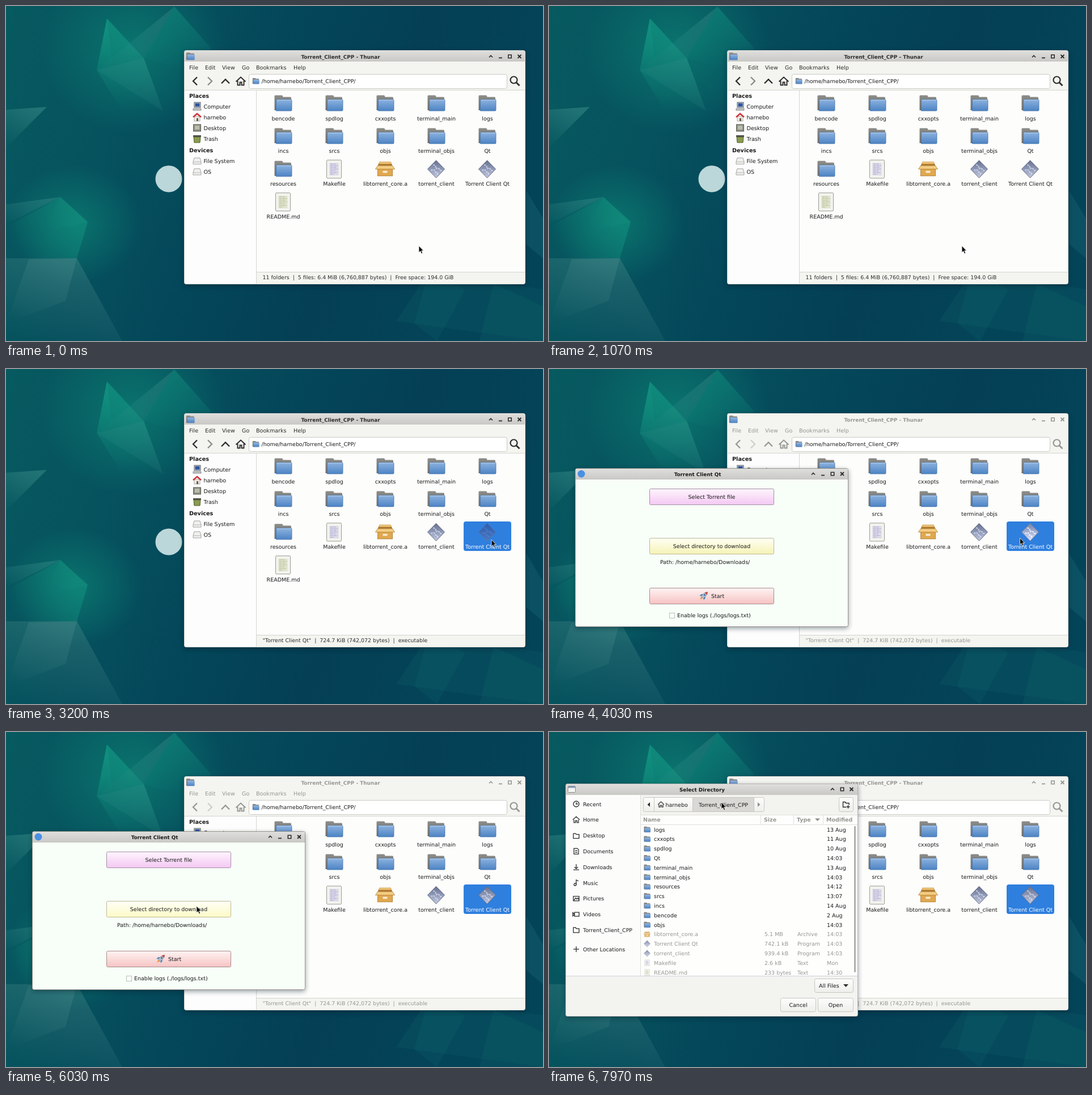
An HTML page for the animation above (8 s loop, 947 by 591 pixels).

```html
<!DOCTYPE html>
<html lang="en">
<head>
<meta charset="utf-8">
<title>Torrent Client Qt</title>
<style>
  html, body { margin: 0; width: 100%; height: 100%; overflow: hidden; background: #04495c; }
  svg { display: block; width: 100vw; height: 100vh; }
  text { font: 9.5px "DejaVu Sans", sans-serif; fill: #1a1a1a; white-space: pre; text-rendering: geometricPrecision; }
  #files { --fg: #2c2c2c; --off: #8b8b89; }
  #files.back { --fg: #969692; --off: #cfcfcb; }
  #files.back .bar { fill: #f4f4f0; }
  #files .fg { fill: var(--fg); }
  #files .ln { stroke: var(--fg); }
  #files .off { stroke: var(--off); }
  .ln, .off { fill: none; stroke: #2c2c2c; }
</style>
</head>
<body>
<svg id="stage" viewBox="0 0 947 591" xmlns="http://www.w3.org/2000/svg"></svg>
<script>
const USER = 'harnebo', LOOP = 8000;

// ---- drawing helpers ----
const text = (x, y, s, o = {}) =>
  `<text x="${x}" y="${y + 3.5}" class="${o.cls || ''}" ${o.id ? `id="${o.id}"` : ''} text-anchor="${o.mid ? 'middle' : 'start'}" style="font-size:${o.size || 9.5}px;${o.bold ? 'font-weight:bold;' : ''}${o.fill ? `fill:${o.fill}` : ''}">${s}</text>`;
const rect = (x, y, w, h, fill, extra = '') =>
  `<rect x="${x}" y="${y}" width="${w}" height="${h}" fill="${fill}" ${extra}/>`;
const line = (d, w = 1, cls = 'ln', extra = '') => `<path d="${d}" class="${cls}" stroke-width="${w}" ${extra}/>`;
const poly = (pts, fill, o = 1) => `<polygon points="${pts}" fill="${fill}" opacity="${o}"/>`;
const at = (x, y, body, k = 1) => `<g transform="translate(${x} ${y}) scale(${k})">${body}</g>`;
const stops = list => list.map((c, i) => `<stop offset="${i / (list.length - 1)}" stop-color="${c}"/>`).join('');
const grad = (id, list, dir = 'x2="0" y2="1"') => `<linearGradient id="${id}" ${dir}>${stops(list)}</linearGradient>`;
const fade = (id, c, dir = 'x2="0" y2="1"') => `<linearGradient id="${id}" ${dir}><stop stop-color="${c}"/><stop offset="1" stop-color="${c}" stop-opacity="0"/></linearGradient>`;
const glow = (id, c) => `<radialGradient id="${id}"><stop stop-color="${c}"/><stop offset="1" stop-color="${c}" stop-opacity="0"/></radialGradient>`;

const defs = `<defs>
  ${grad('sky', ['#075a60', '#06535e', '#04475a', '#043f55', '#044459'], 'x2="1" y2=".25"')}
  ${fade('peak', '#14a189')}
  ${fade('rim', '#3a8f8a', 'x1=".6" x2="0" y2="1"')}
  ${fade('shard', '#12927f', 'x1="1" x2="0" y2=".4"')}
  ${fade('slope', '#4b8a8b', 'x1=".7" x2=".2" y2="1"')}
  ${glow('green', '#0d8a78')}
  ${grad('title', ['#dededc', '#c9c8c5'])}
  ${grad('blue', ['#8db3e0', '#4c83c3'])}
  ${grad('tab', ['#8c8c88', '#6e6e6b'])}
  ${grad('gem', ['#68718e', '#8f99b8', '#c5cce2'])}
  ${grad('pink', ['#fff5fd', '#f3c8f3'])}
  ${grad('yellow', ['#fffff4', '#f5f3b6'])}
  ${grad('yellowLit', ['#fffff8', '#fcfac6'])}
  ${grad('red', ['#fff3f2', '#f6c3c3'])}
  ${grad('plain', ['#fdfdfc', '#eeeeeb'])}
  <filter id="soft" x="-10%" y="-10%" width="120%" height="125%"><feGaussianBlur stdDeviation="4"/></filter>
</defs>`;

// ---- icons, centred on 0,0 ----
const folder = `<path d="M-15 12V-13q0-1.500 1.500-1.500H-2q1.500 0 2 3H13q1.500 0 1.500 2V12z" fill="url(#tab)"/>
  <path d="M-12 13V-5.500q0-1.500 1.500-1.500H14q1.500 0 1.500 1.500V11.500q0 1.500-1.500 1.500z" fill="url(#blue)" stroke="#4674ad" stroke-width=".8"/>
  <path d="M-11-6H14.500" stroke="#b9d2ef" stroke-width="1"/>`;
const paper = tint => rect(-13, -16, 26, 32, '#f3f3ee', 'rx="1.500" stroke="#9a9a95"') + rect(-8, -11, 16, 22, tint, 'opacity=".3"') +
  line('M-7-9H3M-7-6H7M-7-3H5M-7 0H7M-7 3H2M-7 6H6M-7 9H0', 1, '', `stroke="${tint}" stroke-dasharray="5 1"`);
const box = `<path d="M-10-13H10L13-6H-13z" fill="#a8742a"/>
  <path d="M-10-13H10L11-9H-11z" fill="#e9bd72"/>
  ${rect(-13, -2, 26, 14, '#e0a850', 'stroke="#a87828" stroke-width=".8"')}
  <path d="M-17 0L-13-6H13L17 0z" fill="#f3cd84" stroke="#b07d2c" stroke-width=".8"/>${rect(-4, 3, 8, 3.5, '#f8ecd2')}`;
const diamond = 'M0-15.500L15 0L0 15.500L-15 0z';
const gem = `<path d="${diamond}" fill="url(#gem)" stroke="#666d83" stroke-width="1"/>
  <path d="M-5-8l4 3 1 4 4-1 3 4 4 1M-9 2l5-1 3 4 3 1 1 4" fill="none" stroke="#e6eaf6" stroke-width="2" stroke-dasharray="3 1.500" opacity=".75"/>`;
const pc = rect(-5, -7, 11, 9, '#d5d7da', 'stroke="#55585d"') + rect(-3.5, -5.5, 8, 6, '#2c55a0') + rect(-7, 4, 14, 3, '#c9cbce', 'stroke="#66696d" stroke-width=".7"');
const home = rect(-5, -1, 10, 8, '#eeeae4', 'stroke="#8d8a85" stroke-width=".7"') + rect(-1, 2, 3, 5, '#6d5b4a') +
  `<path d="M-7 0L0-6L7 0" fill="none" stroke="#d2343c" stroke-width="2.600"/>`;
const desk = rect(-6.500, -6, 13, 12, '#8d907f', 'stroke="#5c5f55"') + rect(-4, -4, 8, 7, '#b9bcae');
const bin = `<path d="M-6-3H6L5 7H-5z" fill="#8a9c50" stroke="#4e5c26"/>${rect(-7, -6, 14, 3, '#4f5148')}`;
const disk = `<path d="M-5-5H5L7 2V6H-7V2z" fill="#f0f0ee" stroke="#999996" stroke-width=".9"/><path d="M-7 2H7" stroke="#b4b4b0"/>`;
const rocket = `<g transform="rotate(45)"><path d="M-3 3L-6 7V2L-3-2zM3 3L6 7V2L3-2z" fill="#3a7fc0"/>
  <path d="M0-11Q5-5 3 5H-3Q-5-5 0-11z" fill="#aebdca" stroke="#65798a" stroke-width=".6"/>
  <path d="M0-11Q3-8 3.200-6H-3.200Q-3-8 0-11z" fill="#d0403e"/><circle cy="-2.500" r="1.700" fill="#2f6daa"/>
  <path d="M-2.500 5.500H2.500L0 11z" fill="#f2953a"/></g>`;

const buttons = (xs, y) => {
  const [up, low, max, end] = xs;
  return line(`M${up - 3} ${y + 1.5}l3-3 3 3`, 1.7) + (low ? line(`M${low - 3} ${y + 2.5}h6`, 1.8) : '') +
    line(`M${max - 2.7} ${y - 2.7}h5.400v5.400h-5.400z`, 1.6) + line(`M${end - 3} ${y - 3}l6 6m0-6l-6 6`, 1.8);
};
const frame = (x, y, w, h, bg, edge) =>
  rect(x, y + 3, w, h, '#001820', 'rx="4" opacity=".4" filter="url(#soft)"') +
  rect(x + .5, y + .5, w - 1, h - 1, bg, `rx="3" stroke="${edge}"`) +
  `<path class="bar" d="M${x + 1} ${y + 20}V${y + 4}q0-3 3-3H${x + w - 4}q3 0 3 3V${y + 20}z" fill="url(#title)"/>`;

// ---- desktop ----
const desktop = rect(0, 0, 947, 591, 'url(#sky)') +
  '<ellipse cx="225" cy="75" rx="165" ry="150" fill="url(#green)" opacity=".6"/>' +
  '<ellipse cx="120" cy="385" rx="120" ry="105" fill="url(#green)" opacity=".6"/>' +
  poly('178,22 243,92 277,185 205,185 160,113', 'url(#peak)', .6) +
  poly('178,22 188,105 160,113', 'url(#peak)', .35) +
  poly('297,1 362,75 314,112 243,92', 'url(#peak)', .4) +
  poly('297,1 243,92 160,113', 'url(#rim)', .35) +
  poly('160,113 243,92 277,185', 'url(#rim)', .3) +
  poly('0,183 72,178 0,250', 'url(#rim)', .5) +
  poly('0,350 96,337 0,385', 'url(#rim)', .4) +
  poly('96,337 144,381 125,445 0,445 0,390', 'url(#shard)', .7) + poly('96,337 144,381 60,400', 'url(#shard)', .4) +
  poly('0,445 125,445 205,591 0,591', 'url(#slope)', .4) + poly('125,445 105,520 0,560 40,447', 'url(#slope)', .35) +
  poly('917,325 947,375 947,445 917,420', '#1a6470', .4) +
  poly('745,470 688,556 947,591 947,500', '#0a5b66', .35) + poly('745,470 810,500 760,591 720,560', '#126a6e', .2) +
  poly('860,490 947,530 947,591 835,591', '#147070', .18) +
  '<circle cx="287" cy="305" r="23.500" fill="#bcd7d9"/>';

// ---- file manager ----
const items = ['bencode', 'spdlog', 'cxxopts', 'terminal_main', 'logs', 'incs', 'srcs', 'objs', 'terminal_objs', 'Qt',
  'resources', 'Makefile', 'libtorrent_core.a', 'torrent_client', 'Torrent Client Qt', 'README.md'];
const special = {
  11: paper('#a9a4d6'), 12: box, 13: gem, 15: paper('#b4bd8c'),
  14: `<g id="pick">${gem}</g><path id="tint" d="${diamond}" fill="#124fae" opacity=".72"/>`
};
const grid = items.map((name, i) => {
  const x = 489 + i % 5 * 90, y = 172 + Math.floor(i / 5) * 57.9;
  return at(x - .5, y, special[i] || folder) + text(x, y + 26, name, { mid: 1, id: i == 14 ? 'pickName' : '' });
}).join('');
const places = [['Computer', pc, 177], [USER, home, 196], ['Desktop', desk, 215], ['Trash', bin, 234], ['File System', disk, 273], ['OS', disk, 292]]
  .map(([s, icon, y]) => at(337, y, icon) + text(348.5, y, s, { size: 9.6 })).join('');
const menu = [['File', 323], ['Edit', 351], ['View', 381], ['Go', 416], ['Bookmarks', 441], ['Help', 507]]
  .map(([s, x]) => text(x, 108, s, { cls: 'fg', size: 9.6 })).join('');

const files = `<g id="files">${frame(314, 78, 602, 413, '#f4f4f0', '#d9d9d5')}
  ${at(325, 89, folder, .47)}${text(590, 89, 'Torrent_Client_CPP - Thunar', { cls: 'fg', bold: 1, size: 8.9, mid: 1 })}
  ${buttons([855, 872, 888.5, 905.5], 89)}${menu}
  ${line('M337 125.500l-7 7 7 7M380 136.500l7-7 7 7', 2.3)}${line('M356 125.500l7 7-7 7', 2.3, 'off')}
  ${line('M405.500 133.500l8.500-8 8.500 8M408.500 132v7.500h4v-5h3v5h4v-7.500', 1.9)}
  ${rect(428.5, 120.5, 455, 25, '#fff', 'rx="3" stroke="#c9c9c4"')}${at(440.5, 132.5, folder, .38)}
  ${text(450.5, 132.5, `/home/${USER}/Torrent_Client_CPP/`, { size: 9.45 })}
  <circle cx="895.500" cy="130.500" r="6" class="ln" stroke-width="2.200"/>${line('M900 135l5.500 5.500', 2.8)}
  ${rect(315, 148.5, 126.5, 341, '#fdfdfd')}${rect(441.5, 148.5, 473.5, 321, '#fdfdfc')}
  ${line('M315 148.500H915M441.500 148V490M442 469.500H915', 1, '', 'stroke="#d4d4cf"')}
  ${text(323, 158, 'Places', { bold: 1, size: 9.7 })}${text(323, 254, 'Devices', { bold: 1, size: 9.7 })}${places}
  ${rect(807, 269, 84, 52, '#2f7fde', 'rx="4" id="mark"')}${grid}
  ${text(452.5, 478.5, '', { id: 'status', cls: 'fg', size: 9.42 })}</g>`;

// ---- client window ----
const bigButton = (y, fill, edge, id) => rect(177.5, y + .5, 219, 28, `url(#${fill})`, `rx="2" stroke="${edge}" id="${id}"`);
const client = `<g id="client">${frame(46, 175, 482, 280, '#f8fef8', '#96968c')}
  <circle cx="57" cy="185" r="6.500" fill="#4a90e2"/>
  ${text(262, 185, 'Torrent Client Qt', { bold: 1, size: 8.8, mid: 1 })}${buttons([466, 483, 500, 517], 185)}
  ${bigButton(211, 'pink', '#a58fa6', 'b1')}${text(287, 225.5, 'Select Torrent file', { mid: 1 })}
  ${bigButton(298, 'yellow', '#bdb994', 'dirButton')}${text(287, 312.5, 'Select directory to download', { mid: 1 })}
  ${text(196, 340.5, `Path: /home/${USER}/Downloads/`)}
  ${bigButton(386, 'red', '#a88c8c', 'b3')}${at(273, 400, rocket, .85)}${text(286, 400, 'Start')}
  ${rect(212.5, 430.5, 9, 9, '#fdfffd', 'stroke="#b9bdb9"')}${text(226, 434.5, 'Enable logs (./logs/logs.txt)')}</g>`;

// ---- directory dialog ----
const glyph = {
  Recent: '<circle r="5"/><path d="M0-3V0H3"/>', Home: '<path d="M-6 0L0-5.500L6 0M-4 0V5H-1.300V1.500H1.300V5H4V0"/>',
  Desktop: '<path d="M-5 5V-3.500H-1L0-2H5V5z"/>', Documents: '<path d="M-4-5H2L4-3V5H-4zM-2-1H2M-2 2H2"/>',
  Downloads: '<path d="M0-5V3M-3 0L0 3L3 0M-5 5H5"/>', Music: '<circle cx="-2" cy="3" r="2"/><path d="M0 3V-5L4-3"/>',
  Pictures: '<path d="M-5-4H5V4H-5zM-4 3L-1-1L1 1L3-1L5 3"/>', Videos: '<path d="M-3-3.500H5V3.500H-3zM-6-3V3L-3 0z"/>',
  Torrent_Client_CPP: '<path d="M-5 4.500V-4.500H-1L0-2.500H5V4.500z"/>', 'Other Locations': '<path d="M-5 0H5M0-5V5"/>'
};
const sidebar = Object.entries(glyph).map(([s, g], i) => {
  const y = 127 + i * 27.8 + (i == 9 ? 6 : 0);
  return at(48, y, `<g fill="none" stroke="#2c2c2c" stroke-width="1.300">${g}</g>`) + text(60, y, s, { size: 9.4 });
}).join('');
const rows = `logs|13 Aug;cxxopts|11 Aug;spdlog|10 Aug;Qt|14:03;terminal_main|13 Aug;terminal_objs|14:03;resources|14:12;srcs|13:07;incs|14 Aug;bencode|2 Aug;objs|14:03;libtorrent_core.a|14:03|5.1 MB|Archive;Torrent Client Qt|14:03|742.1 kB|Program;torrent_client|14:03|939.4 kB|Program;Makefile|Mon|2.6 kB|Text;README.md|14:30|233 bytes|Text`
  .split(';').map((row, i) => {
    const [name, date, size, type] = row.split('|'), y = 172 + i * 16.8, o = size ? { fill: '#979793' } : {};
    const icon = !size ? folder : i == 11 ? box : i < 14 ? gem : paper(i == 14 ? '#a9a4d6' : '#b4bd8c');
    return `<g opacity="${size ? .8 : 1}">${at(173, y, icon, i > 13 ? .34 : .37)}</g>` + text(185, y, name, o) + text(490, y, date, o) +
      (size ? text(380, y, size, o) + text(438, y, type, o) : '');
  }).join('');
const heads = [['Name', 166], ['Size', 379], ['Type', 437], ['Modified', 489]]
  .map(([s, x]) => text(x, 154, s, { bold: 1, fill: '#969692' })).join('');
const flat = (x, y, w, h, fill = 'url(#plain)') => rect(x + .5, y + .5, w - 1, h - 1, fill, 'rx="3" stroke="#c6c6c1"');

const dialog = `<g id="dialog">${frame(29, 91, 516, 411, '#f3f3f0', '#b4b4ae')}
  ${rect(33.5, 95.5, 13, 11, '#f4f4f2', 'stroke="#8f8f8c" rx="1"')}${rect(34, 96, 12, 2.5, '#8296b4')}
  ${text(270, 101, 'Select Directory', { bold: 1, size: 8.8, mid: 1 })}${buttons([500, 0, 517, 533.5], 101)}
  ${rect(30, 111, 131, 320, '#fcfcfb')}${sidebar}
  ${flat(166, 115, 214, 26)}${rect(253, 116, 108, 24, '#d9d8d4')}
  ${line('M185.500 116v24M253.500 116v24M361.500 116v24', 1, '', 'stroke="#c6c6c1"')}
  ${poly('178,124 178,132 173.500,128', '#2c2c2c')}${poly('368,124 368,132 372.500,128', '#8f8f8b')}
  ${at(197.5, 128, `<g fill="none" stroke="#2c2c2c" stroke-width="1.300">${glyph.Home}</g>`, .9)}
  ${text(205.5, 128, USER)}${text(307.5, 128, 'Torrent_Client_CPP', { mid: 1, size: 9.4 })}
  ${flat(511, 115, 26, 26)}${line('M524 132.500h-5.500v-9h4l1 2h5.500v3M527.500 129v6M524.500 132h6', 1.4)}
  ${rect(162, 146, 382, 285, '#fefefd')}${heads}${poly('469,152.500 478,152.500 473.500,157', '#8a8a86')}
  ${line('M162 146.500H544M162 163.500H544M373.500 147V163M431.500 147V163M483.500 147V163M161.500 111V431', 1, '', 'stroke="#deded9"')}
  <clipPath id="list"><rect x="162" y="164" width="382" height="266"/></clipPath><g clip-path="url(#list)">${rows}</g>
  ${rect(538.5, 166, 2, 258, '#8d8d89', 'rx="1"')}${line('M30 430.500H544', 1, '', 'stroke="#d2d2dd"')}
  ${flat(468, 435, 69, 25)}${text(476, 447.5, 'All Files')}${poly('519,445 528,445 523.500,450', '#2c2c2c')}
  ${flat(408, 469, 63, 25)}${text(439.5, 481, 'Cancel', { mid: 1 })}${flat(474, 469, 63, 25)}${text(505.5, 481, 'Open', { mid: 1 })}</g>`;

const pointer = `<path id="pointer" d="M0 0V12L2.700 9.500L4.600 14L6.700 13L4.800 8.800H8.400z" fill="#0a0a0a" stroke="#fff" stroke-width=".8"/>`;
document.getElementById('stage').innerHTML = defs + desktop + files + client + dialog + pointer;

// ---- timeline ----
const $ = id => document.getElementById(id);
const SELECT = 2450, LAUNCH = 3500, CHOOSE = 6700;
// start, end, x, y, upward bow
const moves = [[0, 0, 728, 423, 0], [1250, 1900, 856, 301, 0], [3850, 5200, 336, 307, 8], [7000, 7850, 304, 124, 0]];

function mouse(t) {
  let x = 0, y = 0;
  for (const [a, b, tx, ty, bow] of moves) {
    if (t < a) break;
    const u = b > a ? Math.min(1, (t - a) / (b - a)) : 1, k = u * u * (3 - 2 * u);
    x += (tx - x) * k;
    y += (ty - y) * k - bow * Math.sin(Math.PI * u);
  }
  return [x, y];
}
const inside = ([x, y], l, t, r, b) => x >= l && x < r && y >= t && y < b;
const show = (id, on) => $(id).setAttribute('visibility', on ? 'visible' : 'hidden');

function draw(t) {
  const pos = mouse(t), picked = t >= SELECT, open = t >= LAUNCH;
  $('pointer').setAttribute('transform', `translate(${pos})`);
  show('mark', picked);
  show('tint', picked && !open);
  show('client', open);
  show('dialog', t >= CHOOSE);
  $('files').classList.toggle('back', open);
  $('pickName').style.fill = picked ? '#fff' : '';
  $('pick').style.filter = inside(pos, 807, 269, 891, 321) ? 'brightness(1.15)' : '';
  $('status').textContent = picked
    ? '"Torrent Client Qt"  |  724.7 KiB (742,072 bytes)  |  executable'
    : '11 folders  |  5 files: 6.4 MiB (6,760,887 bytes)  |  Free space: 194.0 GiB';
  $('dirButton').setAttribute('fill', inside(pos, 177, 298, 397, 327) ? 'url(#yellowLit)' : 'url(#yellow)');
}

const begin = performance.now();
function tick() {
  draw((performance.now() - begin) % LOOP);
  requestAnimationFrame(tick);
}
tick();
</script>
</body>
</html>
```
